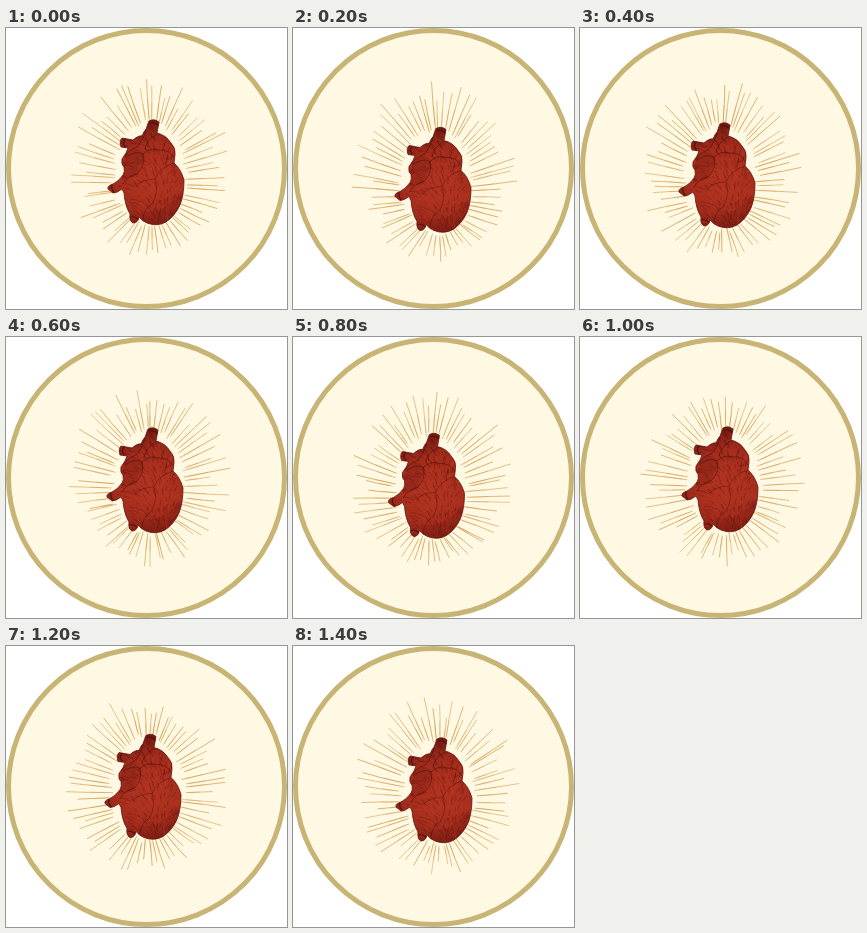
An HTML page with a canvas that plays this animation: 281 by 281 pixels, repeating every 1600 ms.

```html
<!DOCTYPE html>
<html>
<head>
<meta charset="utf-8">
<style>
html, body { margin: 0; width: 100%; height: 100%; overflow: hidden; background: #fff; }
canvas { display: block; }
</style>
</head>
<body>
<canvas id="stage" width="281" height="281"></canvas>
<script>
const ctx = document.getElementById('stage').getContext('2d');
const STEP = 200, RAYS = 66;

// Heart shift at each step
const shifts = [[0, 0], [0, 7.5], [-3, 3], [-1, -1], [-6.5, 4.5], [0, -2], [-3, -3.5], [1, 0]];

function random(seed) {
  return () => {
    seed = (seed * 16807) % 2147483647;
    return seed / 2147483647;
  };
}

function line(d, color, width) {
  ctx.strokeStyle = color;
  ctx.lineWidth = width;
  ctx.stroke(new Path2D(d));
}

function fill(path, color) {
  ctx.fillStyle = color;
  ctx.fill(path);
}

// Rays run from an ellipse around the heart towards a larger one.
function drawRays(index, dx, dy) {
  const rnd = random(4127 + index * 977);
  for (let i = 0; i < RAYS; i++) {
    const a = (i + (rnd() - 0.5) * 0.7) / RAYS * Math.PI * 2;
    const c = Math.cos(a), s = Math.sin(a);
    const gap = rnd() * 6;
    const x1 = 144 + dx + c * (34 + gap), y1 = 146 + dy + s * (50 + gap);
    const x2 = 142 + dx / 2 + c * 84, y2 = 140 + dy / 2 + s * 90;
    const len = 0.5 + 0.5 * rnd(), bend = (rnd() - 0.5) * 1.5;
    const at = k => [x1 + (x2 - x1) * len * k, y1 + (y2 - y1) * len * k];
    const [mx, my] = at(0.5);
    line(`M${at(0)}Q${mx + bend} ${my - bend} ${at(1)}`, `rgba(208,148,62,${0.6 + rnd() * 0.3})`, 0.8);
    line(`M${at(0.1)}L${at(0.5)}`, 'rgba(198,134,48,.35)', 0.8);
  }
}

const outline = new Path2D(`M143 93Q148 90 153 94L151 105Q160 107 165 115Q170 120 169 127
  L168 135Q175 141 178 152Q178 167 174 177Q169 188 160 194Q151 199 141 195Q136 193 133 189
  Q132 195 127 195Q123 193 124 186Q119 178 118 165L116 161Q111 165 107 165L102 161
  Q101 158 107 156Q113 153 117 147Q119 144 118 139Q115 137 116 131L120 125L122 120
  L115 119Q113 113 116 110L127 112Q133 107 136 108Q138 103 140 101Z`);

const shade = ctx.createRadialGradient(148, 151, 8, 145, 149, 55);
shade.addColorStop(0, '#b03320');
shade.addColorStop(0.6, '#a32c1c');
shade.addColorStop(1, '#701a13');

function drawHeart() {
  fill(outline, shade);
  ctx.save();
  ctx.clip(outline);
  fill(new Path2D('M119 127Q130 116 137 125Q138 138 128 149L116 152Z'), 'rgba(92,18,14,.2)');
  fill(new Path2D('M134 180Q151 192 175 164L180 183L159 200L137 197Z'), 'rgba(90,16,12,.2)');

  // Engraved hatching
  const rnd = random(8831);
  for (let i = 0; i < 420; i++) {
    const x = 112 + rnd() * 67, y = 92 + rnd() * 106;
    const a = 0.8 + (x - 145) / 28 + rnd() * 0.6, n = 2 + rnd() * 4;
    line(`M${x} ${y}l${Math.cos(a) * n} ${Math.sin(a) * n}`,
      rnd() < 0.65 ? 'rgba(73,12,10,.4)' : 'rgba(207,69,40,.4)', 0.7);
  }
  ctx.restore();

  const ink = 'rgba(70,13,10,.6)';
  line('M140 102Q137 113 131 119Q122 122 119 128M151 106Q141 111 139 121M136 108Q143 112 142 119', ink, 0.9);
  line('M120 129Q130 122 137 126Q144 119 153 122Q163 121 168 130M137 126Q140 137 131 146Q121 148 117 156', ink, 0.9);
  line('M168 135Q154 139 149 151Q153 165 146 176Q138 180 137 191M149 151Q136 151 130 158', ink, 0.7);
  line('M144 95Q148 94 152 97M119 111Q116 114 119 119M106 157Q105 161 108 164M125 189Q128 188 132 191', '#51100d', 1.2);
  ctx.strokeStyle = '#64150f';
  ctx.lineWidth = 0.8;
  ctx.stroke(outline);
}

function draw(now) {
  const index = Math.floor(now / STEP) % shifts.length;
  const [dx, dy] = shifts[index];
  ctx.clearRect(0, 0, 281, 281);
  ctx.beginPath();
  ctx.arc(140.5, 140.5, 138, 0, Math.PI * 2);
  ctx.fillStyle = '#fff8e3';
  ctx.fill();
  ctx.strokeStyle = '#c8b474';
  ctx.lineWidth = 5;
  ctx.stroke();

  ctx.lineCap = ctx.lineJoin = 'round';
  drawRays(index, dx, dy);
  ctx.save();
  ctx.translate(dx, dy);
  drawHeart();
  ctx.restore();
  requestAnimationFrame(draw);
}
requestAnimationFrame(draw);
</script>
</body>
</html>
```
